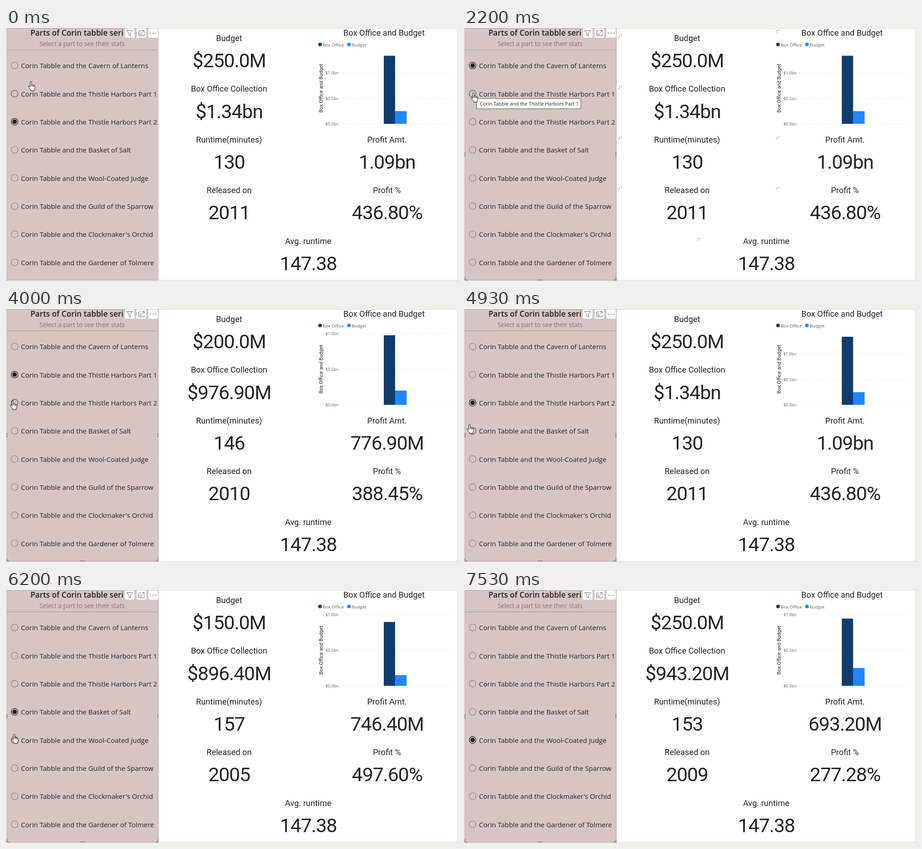
An HTML page for the animation above (7940 ms loop, 999 by 561 pixels).

```html
<!DOCTYPE html>
<html lang="en">
<head>
<meta charset="utf-8">
<title>Series dashboard</title>
<style>
html, body { margin: 0; width: 100%; height: 100%; overflow: hidden; background: #fff; }
svg { display: block; width: 999px; height: 561px; }
text { fill: #252423; white-space: pre; }
.ui { font-family: "Open Sans", "Noto Sans", sans-serif; }
.din { font-family: Roboto, "Liberation Sans", sans-serif; }
.mid { text-anchor: middle; }
.label { font-size: 18.3px; }
.value { font-size: 43px; letter-spacing: -1.1px; }
.small { font-size: 9.8px; fill: #605e5c; }
.tick { font-size: 9px; fill: #605e5c; text-anchor: end; }
</style>
</head>
<body>
<svg id="stage" viewBox="0 0 999 561" xmlns="http://www.w3.org/2000/svg"></svg>
<script>
const LOOP = 7940, STEP = 1000 / 15;
const stage = document.getElementById('stage');

function add(tag, attrs, text, parent = stage) {
  const el = document.createElementNS('http://www.w3.org/2000/svg', tag);
  set(el, attrs);
  if (text !== undefined) el.textContent = text;
  parent.appendChild(el);
  return el;
}
function set(el, attrs) {
  for (const k in attrs) el.setAttribute(k, attrs[k]);
}
const show = (el, on) => set(el, { visibility: on ? 'visible' : 'hidden' });

const hero = 'Corin Tabble and the ';
const parts = ['Cavern of Lanterns', 'Thistle Harbors Part 1', 'Thistle Harbors Part 2',
  'Basket of Salt', 'Wool-Coated Judge', 'Guild of the Sparrow',
  "Clockmaker's Orchid", 'Gardener of Tolmere'];
const rowY = i => 83.2 + i * 62.33;

// budget and takings in millions, runtime, year
const films = [
  [100, 879, 161, 2002],
  [200, 976.9, 146, 2010],
  [250, 1342, 130, 2011],
  [150, 896.4, 157, 2005],
  [250, 943.2, 153, 2009]
];
// click time, time the cards refresh, row
const clicks = [[0, 0, 2], [1870, 2270, 0], [2800, 2930, 1],
  [4330, 4530, 2], [5800, 6000, 3], [6870, 7070, 4]];
// time, x, y of the pointer
const path = [
  [0, 50, 119], [130, 13, 76], [330, 13, 76], [400, 14, 77], [870, 14, 77],
  [1200, 15, 136], [1330, 15, 136], [1470, 15, 143], [2730, 15, 143],
  [2800, 15, 147], [3200, 15, 147], [3330, 15, 161], [3400, 15, 161],
  [4000, 9, 202], [4530, 9, 202], [4930, 6, 254], [5070, 6, 264],
  [5270, 14, 268], [5530, 14, 268], [5600, 20, 269], [5930, 20, 269],
  [6200, 12, 319], [6330, 12, 319], [6470, 11, 333], [6600, 11, 333],
  [6730, 10, 341], [7200, 10, 341], [7470, -30, 345]
];

// slicer panel
add('rect', { x: 1, y: 0, width: 336, height: 560, fill: '#d6c5c3' });
add('text', { class: 'ui', x: 54, y: 16.5, 'font-size': 17.2, 'font-weight': 600 }, 'Parts of Corin tabble seri');
add('text', { class: 'ui', x: 74, y: 40, 'font-size': 13.7, style: 'fill:#7d7473' },
  'Select a part to see their stats');
add('path', { d: 'M2 48.5H336', stroke: '#a39796' });

const icons = add('g', { fill: 'none', stroke: '#666', 'stroke-width': 1 });
for (const x of [262.5, 288.5, 314.5])
  add('rect', { x, y: -1, width: 21.5, height: 22.5, fill: '#fff', stroke: '#e4dcdb' }, undefined, icons);
add('path', { d: 'M266.5 5.5H280L275 11.5V18L271.5 16V11.5Z' }, undefined, icons);
add('path', { d: 'M298 6.5H293.5V17.5H305.5V13M300.5 5.5H305.5V10.5M305 6L299 12M296.5 10V14.5H301' }, undefined, icons);
for (const x of [319, 325, 331])
  add('circle', { cx: x, cy: 11.5, r: 1, fill: '#555', stroke: 'none' }, undefined, icons);

const radios = parts.map((name, i) => {
  const cy = rowY(i);
  add('text', { class: 'ui', x: 33, y: cy + 6.2, 'font-size': 15 }, hero + name);
  return {
    ring: add('circle', { cx: 19, cy, r: 7.5, fill: 'none' }),
    dot: add('circle', { cx: 19, cy, r: 5 })
  };
});

// page outline and panel handles
add('path', { d: 'M1.5 0V560M997.5 0V560M1 .5H998M1 559.5H998', stroke: '#777', 'stroke-dasharray': '1 2', fill: 'none' });
const frame = add('g', { fill: 'none', stroke: '#8a8483' });
add('path', { d: 'M336.5 0V559.5H1.5', 'stroke-width': 1, stroke: '#aaa09f' }, undefined, frame);
add('path', { d: 'M2 553V559H8M330 559H336V553M2 275V285M336 275V285M163 559H174', 'stroke-width': 2 }, undefined, frame);

// cards
function card(x, y, label) {
  add('text', { class: 'din mid label', x, y: y + 6.5 }, label);
  return add('text', { class: 'din mid value', x: x + .3, y: y + 65 });
}
const cards = [card(493, 22, 'Budget'), card(493, 134.5, 'Box Office Collection'),
  card(493, 247, 'Runtime(minutes)'), card(493, 359, 'Released on'),
  card(842, 247, 'Profit Amt.'), card(842, 359, 'Profit %')];
card(668, 472, 'Avg. runtime').textContent = '147.38';

// chart
add('text', { class: 'din mid label', x: 835.5, y: 16.8 }, 'Box Office and Budget');
add('text', { class: 'din mid', 'font-size': 11, transform: 'translate(700 133.5) rotate(-90)' }, 'Box Office and Budget');
const NAVY = '#0f3c6f', BLUE = '#1f87ff', BASE = 212.5;
[[694, NAVY, 'Box Office'], [758, BLUE, 'Budget']].forEach(([x, fill, name]) => {
  add('circle', { cx: x, cy: 36.5, r: 4, fill });
  add('text', { class: 'ui small', x: x + 6, y: 40.5 }, name);
});
const grid = [0, .5, 1].map(v => ({
  v,
  line: add('path', { stroke: '#c8c6c4', 'stroke-dasharray': '1 4' }),
  text: add('text', { class: 'ui tick', x: 735 }, '$' + v.toFixed(1) + 'bn')
}));
const bars = [add('rect', { x: 835, width: 25, fill: NAVY }), add('rect', { x: 860, width: 25.5, fill: BLUE })];

// loading dots beside each card
const spinners = add('g', { fill: '#666' });
const dots = [[347, 21], [695, 9], [347, 134], [347, 246], [695, 246], [347, 358], [695, 358], [521, 471]]
  .flatMap(([x, y]) => [0, 1, 2].map(n => ({
    x, y, n, el: add('circle', { r: .9 }, undefined, spinners)
  })));

const tip = add('g', {});
add('rect', { x: 27.5, y: 156.5, width: 230.5, height: 22.5, fill: '#fff', stroke: '#55504f' }, undefined, tip);
add('text', { class: 'ui', x: 35, y: 171.5, 'font-size': 10.9 }, hero + parts[1], tip);

const hand = add('path', {
  d: 'M4.5 13V2.2a1.5 1.5 0 0 1 3 0V8q2.4-.8 2.8 1 2.2-.6 2.5.9 2.2-.3 2.2 1.6V15q0 2-1.5 4V21.5H6V19.5Q3 16 1.5 13.5 .2 11.5 1.3 10.9 2.6 10.3 4.5 13ZM7.5 8V12M10.3 9V12.5M12.8 10V12.5',
  fill: '#fff', stroke: '#111', 'stroke-width': 1, 'stroke-linejoin': 'round'
});

function pointer(t) {
  const i = path.findIndex(p => p[0] > t);
  if (i < 0) return path[path.length - 1].slice(1);
  const [a, b] = [path[i - 1], path[i]];
  const k = (t - a[0]) / (b[0] - a[0]);
  return [a[1] + (b[1] - a[1]) * k, a[2] + (b[2] - a[2]) * k];
}
const money = m => m >= 1000 ? (m / 1000).toFixed(2) + 'bn' : m.toFixed(2) + 'M';

let shown = -1;
function showFilm(row) {
  if (row === shown) return;
  shown = row;
  const [budget, gross, mins, year] = films[row];
  const profit = gross - budget;
  ['$' + budget.toFixed(1) + 'M', '$' + money(gross), mins, year, money(profit),
    (profit / budget * 100).toFixed(2) + '%'].forEach((s, i) => cards[i].textContent = s);
  const scale = gross > 1000 ? 112.5 : 158;
  for (const g of grid) {
    const y = BASE - g.v * scale;
    set(g.line, { d: `M742 ${y}H981` });
    set(g.text, { y: y + 3.3 });
  }
  [gross, budget].forEach((m, i) => {
    const h = m / 1000 * scale;
    set(bars[i], { y: BASE - h, height: h });
  });
}

function draw(now) {
  const t = Math.floor((now % LOOP + 5) / STEP) * STEP + 4;
  const click = clicks.filter(c => c[0] <= t).pop();
  showFilm(clicks.filter(c => c[1] <= t).pop()[2]);

  const [x, y] = pointer(t);
  set(hand, { transform: `translate(${x.toFixed(1)} ${y.toFixed(1)})` });
  const hover = x < -15 ? -1 : Math.floor((y - 52) / 62.33);
  radios.forEach(({ ring, dot }, i) => {
    const on = i === click[2] || (i === 0 && t >= 400 && t < 1870);
    const ink = on && i === hover ? '#454140' : '#252423';
    set(ring, { stroke: on ? ink : i === hover ? '#4a4645' : '#857b7a', 'stroke-width': on ? 1.3 : 1.1 });
    set(dot, { fill: ink });
    show(dot, on);
  });

  show(frame, t >= 1870);
  show(tip, t >= 1930 && t < 2470);
  show(spinners, t >= click[0] + 60 && t < click[1]);
  for (const d of dots) {
    const a = Math.PI + t / 1000 * 5 - 11 + d.n * .9;
    set(d.el, { cx: d.x + 4.5 * Math.cos(a), cy: d.y + 4.5 * Math.sin(a) });
  }
}

function tick() {
  draw(performance.now());
  requestAnimationFrame(tick);
}
tick();
</script>
</body>
</html>
```
